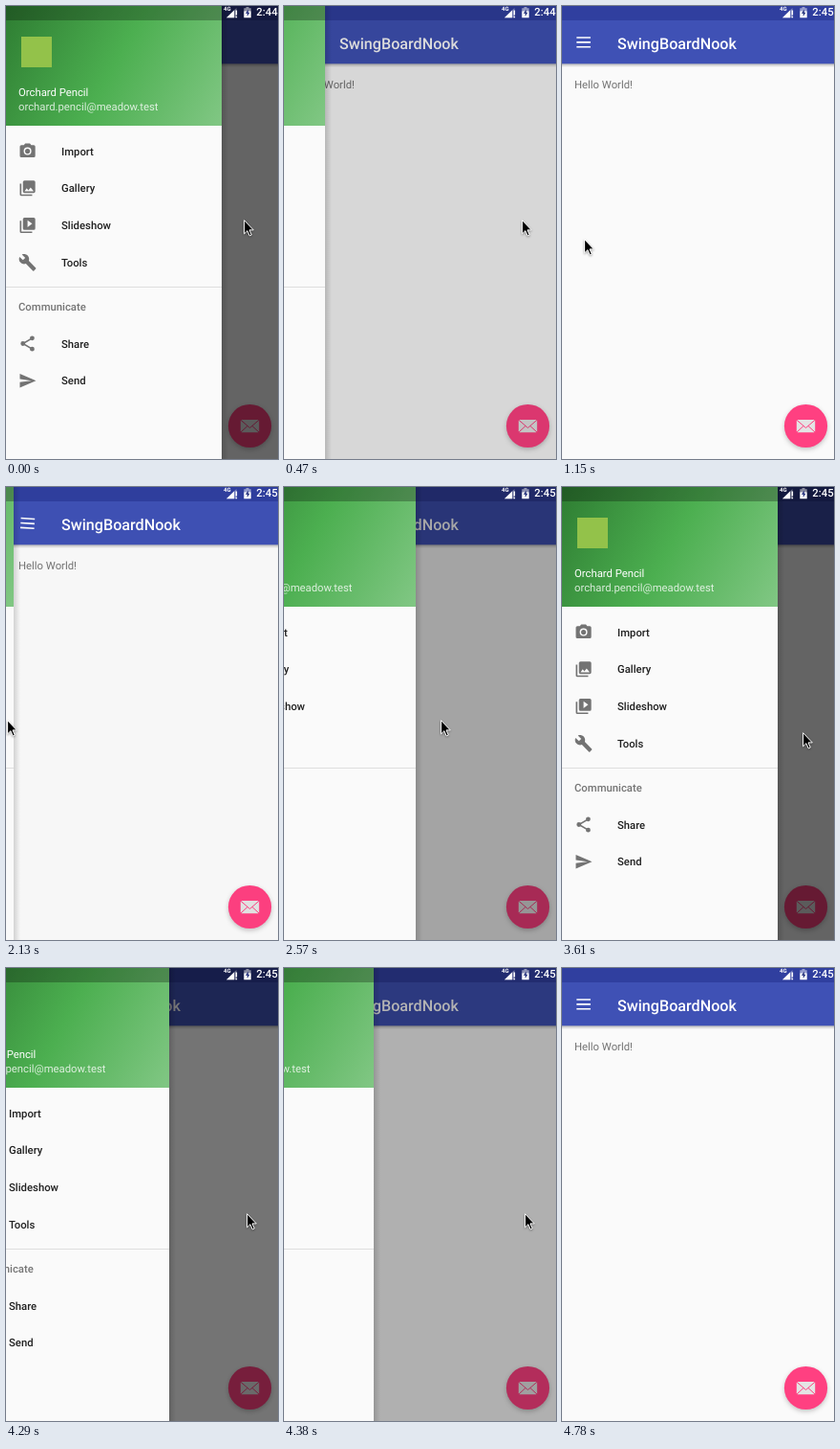
These frames come from a looping animation (285 by 473 pixels, 5240 ms). An HTML page:

```html
<!DOCTYPE html>
<html lang="en">
<head>
<meta charset="utf-8">
<title>Sliding drawer</title>
<style>
  html, body { margin: 0; width: 100%; height: 100%; overflow: hidden; background: #fafafa; }
  svg { display: block; font: 11.3px Roboto, sans-serif; text-rendering: geometricPrecision; }
  .medium { font-weight: 500; }
  #fab { filter: drop-shadow(0 2.5px 2.5px rgba(0, 0, 0, .22)); }
  #cursor { filter: drop-shadow(0 1px 1px rgba(0, 0, 0, .35)); }
</style>
</head>
<body>
<svg width="285" height="473" viewBox="0 0 285 473">
  <defs>
    <linearGradient id="header" gradientUnits="userSpaceOnUse" x1="226" y1="125" x2="0" y2="0">
      <stop stop-color="#81c784"/>
      <stop offset=".5" stop-color="#4caf50"/>
      <stop offset="1" stop-color="#2e7d32"/>
    </linearGradient>
    <linearGradient id="side">
      <stop stop-opacity=".15"/>
      <stop offset="1" stop-opacity="0"/>
    </linearGradient>
    <linearGradient id="below" x2="0" y2="1">
      <stop stop-opacity=".28"/>
      <stop offset="1" stop-opacity="0"/>
    </linearGradient>
  </defs>

  <rect width="285" height="473" fill="#fafafa"/>
  <text x="13" y="86" fill="#737373">Hello World!</text>
  <rect y="60" width="285" height="4" fill="url(#below)"/>
  <rect width="285" height="60.3" fill="#3f51b5"/>
  <rect width="285" height="15" fill="#303f9f"/>
  <path id="burger" d="M15.3 33h14.6m-14.6 4.9h14.6m-14.6 4.9h14.6" stroke="#fff" stroke-width="1.6"/>
  <text class="medium" x="58" y="44.7" font-size="16.14" fill="#fff">SwingBoardNook</text>

  <g id="fab">
    <circle cx="255.5" cy="438.5" r="22.6" fill="#ff4081"/>
    <rect x="245.8" y="432" width="19.4" height="13.2" rx="1" fill="#e4e4e4"/>
    <path d="M246 432.3l9.5 8.2 9.5-8.2M246 445l7-6.5m12 6.5l-7-6.5" fill="none" stroke="#ff4081"/>
  </g>

  <rect id="scrim" width="285" height="473"/>

  <g id="drawer">
    <rect x="226" width="7" height="473" fill="url(#side)"/>
    <rect width="226" height="473" fill="#fafafa"/>
    <rect width="226" height="125" fill="url(#header)"/>
    <rect width="226" height="15" fill-opacity=".27"/>
    <rect x="16" y="32" width="32" height="32" fill="#93c24a"/>
    <g fill="#fff">
      <text x="13" y="94">Orchard Pencil</text>
      <text x="13" y="109" fill-opacity=".8">orchard.pencil@meadow.test</text>
    </g>
    <rect y="293" width="226" height="1" fill="#dfdfdf"/>
    <text class="medium" x="13" y="318" fill="#757575">Communicate</text>
    <g id="items"></g>
  </g>

  <g fill="#fff">
    <text x="228" y="5.3" font-size="6" font-weight="700">4G</text>
    <path d="M231 12.3L241.5 2v10.3z" fill-opacity=".35"/>
    <path d="M231 12.3l8-7.8v7.8z"/>
    <path d="M240.6 4.5h1.5v5h-1.5zm0 6.2h1.5v1.6h-1.5z"/>
    <path d="M251.5 1h3v1.2h2.2v3h-7.4v-3h2.2z" fill-opacity=".5"/>
    <path d="M249.3 5.2h7.4v7.1h-7.4z"/>
    <path d="M253.8 3.6l-2.9 4.2h1.8v3.2l2.7-4.3h-1.6z" fill="#26337f"/>
    <text id="clock" class="medium" x="262.3" y="10.3"></text>
  </g>

  <path id="cursor" d="M.6 .7V14.9L3.9 11.7 6.2 16.9 8.3 16 6 10.9H10.3z" stroke="#fff"/>
</svg>
<script>
const LOOP = 5240, WIDTH = 226, SETTLE = 512;
const SCRIM_LAG = 16; // the dimming trails the drawer by one screen refresh
const byId = id => document.getElementById(id);
const [burger, scrim, drawer, clock, cursor] = ['burger', 'scrim', 'drawer', 'clock', 'cursor'].map(byId);

const dot = (x, y, r) => `M${x} ${y - r}a${r} ${r} 0 0 1 0 ${2 * r} ${r} ${r} 0 0 1 0-${2 * r}`;
const stack = 'M8 2h12a2 2 0 0 1 2 2v12a2 2 0 0 1-2 2H8a2 2 0 0 1-2-2V4a2 2 0 0 1 2-2M2 6h2v14h14v2H4a2 2 0 0 1-2-2z';
const items = [
  ['Import', 151.6, 'M9 2L7.2 4H4a2 2 0 0 0-2 2v12a2 2 0 0 0 2 2h16a2 2 0 0 0 2-2V6a2 2 0 0 0-2-2h-3.2L15 2z' + dot(12, 12, 5) + dot(12, 12, 3.2)],
  ['Gallery', 190.3, stack + 'M11 12l2 2.7 3-3.7 4 5H8z'],
  ['Slideshow', 229, stack + 'M12 14.5v-9l6 4.5z'],
  ['Tools', 267.8, 'M22.7 19l-9.1-9.1c.9-2.3.4-5-1.5-6.9-2-2-5-2.4-7.4-1.3L9 6 6 9 1.6 4.7C.4 7.1.9 10.1 2.9 12.1c1.9 1.9 4.6 2.4 6.9 1.5l9.1 9.1q.7.6 1.4 0l2.3-2.3q.7-.7.1-1.4z'],
  ['Share', 352.5, dot(18, 5, 3) + dot(6, 12, 3) + dot(18, 19, 3), 'M18 5L6 12l12 7'],
  ['Send', 391.2, 'M2 21l21-9L2 3v7l15 2-15 2z'],
];
byId('items').innerHTML = items.map(([label, y, shape, line = '']) => `
  <g transform="translate(12.9 ${y - 9.7}) scale(.807)" fill="#737373" fill-rule="evenodd">
    <path d="${shape}"/><path d="${line}" fill="none" stroke="#737373" stroke-width="2"/>
  </g>
  <text class="medium" x="58" y="${y + 4}" fill="#212121">${label}</text>`).join('');

// Bursts of movement: start, end, number of redraws
const bursts = [[360, 860, 10], [890, 1310, 16], [1490, 1710, 6], [2130, 2630, 10],
  [2690, 2990, 6], [3500, 3610, 5], [4290, 4780, 10]];

// Time, x, y
const pointer = [[0, 249, 223], [526, 249, 223], [860, 92, 242], [1100, 30, 243], [1310, -4, 243],
  [1446, -4, 243], [1710, 1, 243], [2300, 1, 243], [2574, 164, 243], [2740, 252, 243],
  [3475, 252, 243], [3610, 252, 256], [4400, 252, 256], [4640, 290, 262]];

// Time, drawer edge
const drag = [[2095, 0], [2130, 8], [2240, 16], [2352, 30], [2574, 138], [2630, 165], [2690, 185]];

const clamp = v => Math.min(1, Math.max(0, v));
const remaining = (t, start, length) => (1 - clamp((t - start) / length)) ** 5;

function snap(t) {
  const burst = bursts.filter(([start]) => start <= t).pop();
  if (!burst) return 0;
  const [start, end, count] = burst;
  const step = (end - start) / (count - 1);
  return Math.min(end, start + step * Math.floor((t - start) / step + .1));
}

function track(t, keys) {
  const next = keys.findIndex(key => key[0] > t);
  if (next < 0) return keys[keys.length - 1].slice(1);
  const a = keys[Math.max(0, next - 1)], b = keys[next];
  const k = clamp((t - a[0]) / (b[0] - a[0] || 1));
  return a.slice(1).map((v, i) => v + (b[i + 1] - v) * k);
}

function drawerEdge(t) {
  if (t < 2095) return WIDTH * remaining(t, 326, SETTLE);
  if (t < 2690) return track(t, drag)[0];
  if (t < 4262) return WIDTH - 41 * remaining(t, 2660, 330);
  return WIDTH * remaining(t, 4262, SETTLE);
}

function draw(now) {
  const t = snap(now % LOOP);
  const edge = Math.round(drawerEdge(t));
  const open = drawerEdge(t - SCRIM_LAG) / WIDTH;
  const opening = t >= 2095 && t < 4262;
  const [x, y] = track(t, pointer);
  drawer.setAttribute('transform', `translate(${edge - WIDTH})`);
  drawer.setAttribute('visibility', edge ? 'visible' : 'hidden');
  scrim.setAttribute('opacity', .6 * open);
  burger.setAttribute('transform', `rotate(${(opening ? 180 : -180) * open} 22.6 37.9)`);
  cursor.setAttribute('transform', `translate(${Math.round(x)} ${Math.round(y)})`);
  clock.textContent = t < 700 ? '2:44' : '2:45';
}

const begin = performance.now();
function tick() {
  draw(performance.now() - begin);
  requestAnimationFrame(tick);
}
tick();
</script>
</body>
</html>
```
